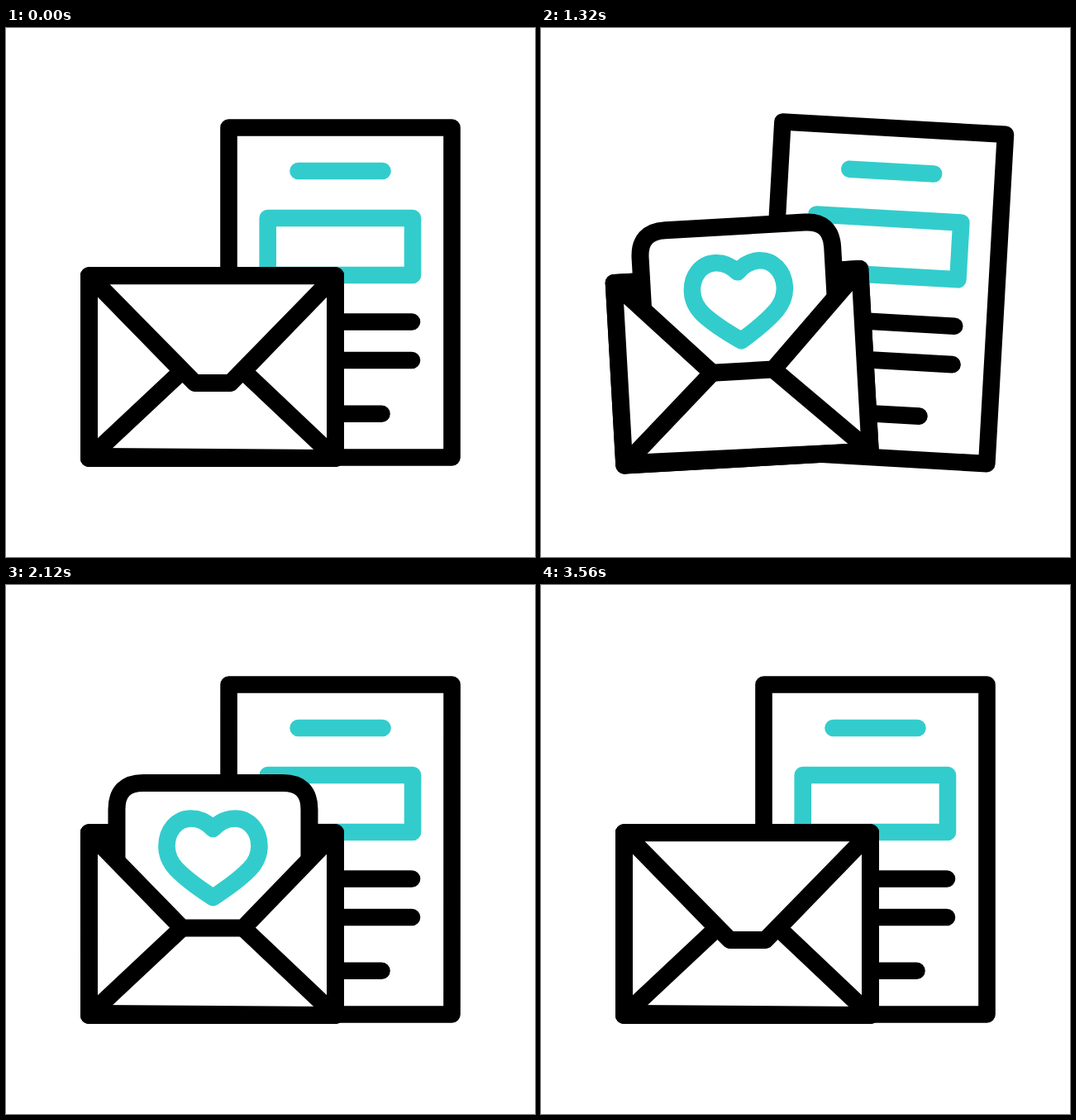
Animation, 640 px wide and 640 px high, one loop 3.6 s. Source, as an HTML page:

```html
<!DOCTYPE html>
<html lang="en">
<head>
<meta charset="utf-8">
<title>Envelope and letter</title>
<style>
  html, body { margin: 0; width: 100%; height: 100%; overflow: hidden; background: #fff; }
  svg { display: block; width: 100vw; height: 100vh; }
  .ink, .teal { fill: none; stroke: #000; stroke-width: 20.6; stroke-linecap: round; stroke-linejoin: round; }
  .teal { stroke: #33cccc; }
  .paper { fill: #fff; }
  .env .ink { stroke-width: 21; }
</style>
</head>
<body>
<svg viewBox="0 0 640 640">
  <clipPath id="pocket"><rect x="60" y="60" width="380" height="455"/></clipPath>

  <g id="page">
    <rect class="ink paper" x="269.5" y="120.5" width="270" height="399"/>
    <path class="teal" d="M353.5 173H455.5"/>
    <rect class="teal" x="316.7" y="230" width="175.3" height="69"/>
    <path class="ink" d="M317 355.5H491M317 402H491M354 466.7H454.5"/>
  </g>

  <g id="env" class="env">
    <rect class="ink paper" x="100.5" y="299.7" width="298" height="220.8"/>
    <path id="flapBack" class="ink paper"/>
    <g clip-path="url(#pocket)">
      <path id="letter" class="ink paper" d="M134 560V271.5Q134 239.5 166 239.5H335Q367 239.5 367 271.5V560"/>
      <path id="heart" class="teal" d="M250.5 295C243 287 234 282.5 224 282.5C207 282.5 194.5 297 194.5 316C194.5 329 200 337 206 343.5C217 355 235 368 250.5 378C266 368 284 355 295 343.5C301 337 306.5 329 306.5 316C306.5 297 294 282.5 277 282.5C267 282.5 258 287 250.5 295Z"/>
    </g>
    <path class="ink paper" d="M100.5 299.7L213 415H287L398.5 299.7V520.5H100.5Z"/>
    <path class="ink" d="M100.5 520.5L213 415M398.5 520.5L287 415"/>
    <path d="M112 508L388 510V520H112Z"/>
    <path id="flapFront" class="ink paper"/>
  </g>
</svg>
<script>
const LOOP = 3600, STEP = 20, HINGE = 299.7;
const el = id => document.getElementById(id);
const parts = {};
for (const id of ["page", "env", "flapBack", "flapFront", "letter", "heart"]) parts[id] = el(id);

// Each track is a list of [time, value] keys, eased in and out between keys.
const flapTip = [[0, 429.5], [333, 188], [633, HINGE], [2658, HINGE], [2958, 188], [3560, 429.5]];
const letterY = [[333, 188], [633, -65], [933, 0], [2265, 0], [2542, -65], [2842, 188]];
const heartY = [[333, 188], [633, -40], [933, 0], [2265, 0], [2542, -40], [2842, 188]];
const tilt = [[627, 0], [927, 6], [1227, -6], [1527, 6], [1827, -6], [2127, 0]];

function at(track, t) {
  if (t <= track[0][0]) return track[0][1];
  for (let i = 1; i < track.length; i++) {
    const [t0, a] = track[i - 1], [t1, b] = track[i];
    if (t < t1) {
      const u = (t - t0) / (t1 - t0);
      return a + (b - a) * u * u * (3 - 2 * u);
    }
  }
  return track[track.length - 1][1];
}

function draw(t) {
  const tip = at(flapTip, t), angle = at(tilt, t), closed = tip > HINGE;
  const flap = `M100.5 ${HINGE}L228.5 ${tip}H271.5L398.5 ${HINGE}Z`;
  parts.flapBack.setAttribute("d", closed ? "" : flap);
  parts.flapFront.setAttribute("d", closed ? flap : "");
  parts.letter.setAttribute("transform", `translate(0 ${at(letterY, t)})`);
  parts.heart.setAttribute("transform", `translate(0 ${at(heartY, t)})`);
  parts.env.setAttribute("transform", `rotate(${angle} 249.5 520)`);
  parts.page.setAttribute("transform", `rotate(${-angle} 404.5 520)`);
}

const start = performance.now();
function tick() {
  const t = (performance.now() - start) % LOOP;
  draw(Math.floor(t / STEP) * STEP);
  requestAnimationFrame(tick);
}
draw(0);
requestAnimationFrame(tick);
</script>
</body>
</html>
```
